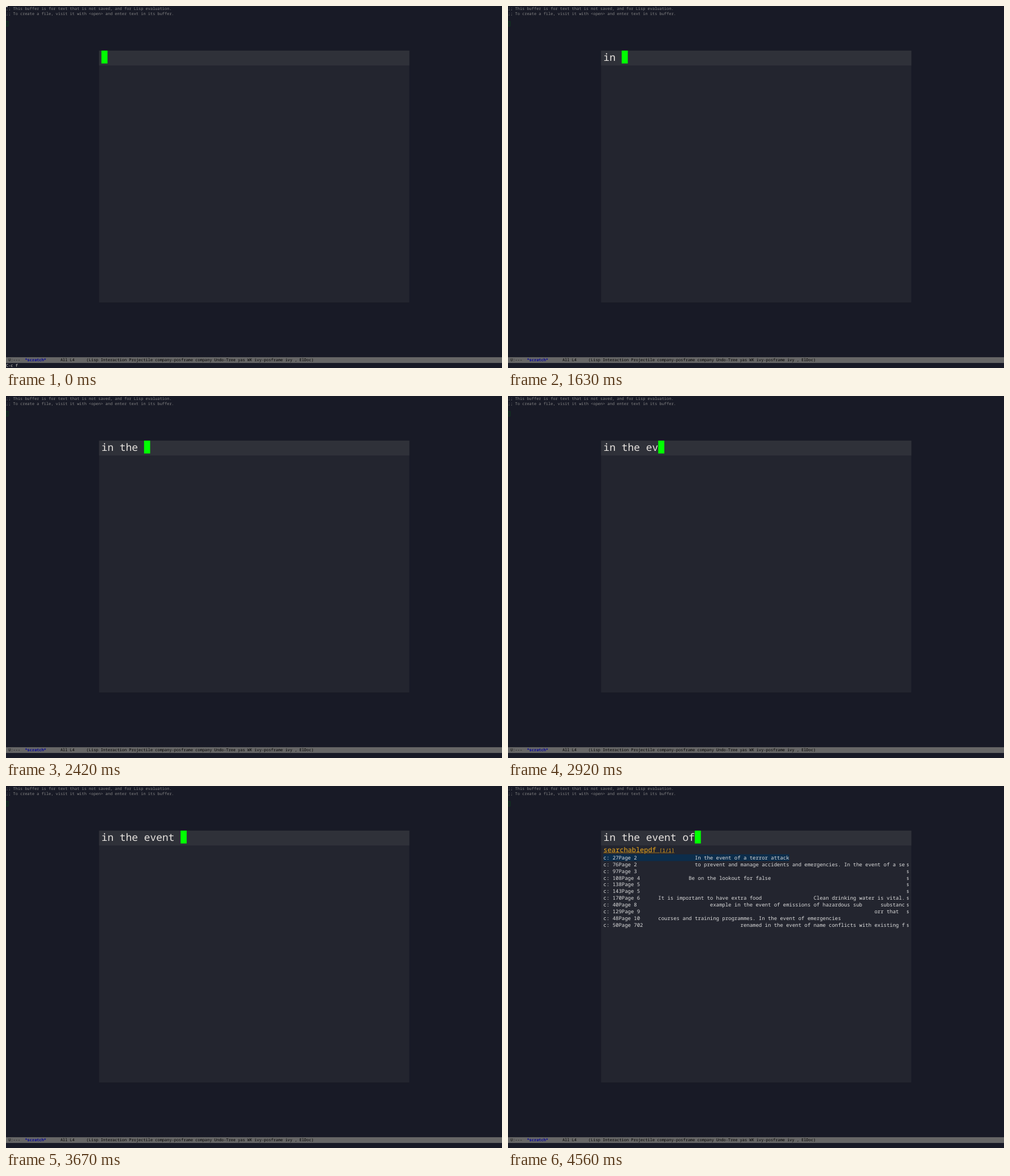
An HTML page that plays this animation: 876 px wide and 640 px high, repeating every 8 s.

```html
<!DOCTYPE html>
<html lang="en">
<head>
<meta charset="utf-8">
<style>
html, body { margin: 0; width: 876px; height: 640px; overflow: hidden; background: #181a26; }
div { position: absolute; white-space: pre; }
/* the screen is laid out on a whole-pixel character grid, then scaled down */
#screen {
  left: 0; top: 0; width: 1466px; height: 1071px;
  transform: scale(.5976); transform-origin: 0 0;
  font: 11.667px/15px "Noto Sans Mono", monospace;
  text-rendering: geometricPrecision;
}
#note { left: 0; top: 0; color: #858585; }
#point { left: 0; top: 45px; width: 5px; height: 13px; border: 1px solid #075018; }
#pointer { left: 0; top: 0; width: 5px; height: 3px; background: #e4e4e4; }
#mode { left: 0; top: 1039px; width: 1466px; height: 17px; line-height: 17px; background: #666; color: #000; }
#mode b { color: #00009c; }
#echo { left: 0; top: 1056px; color: #e4e0d8; }
#panel { left: 275px; top: 132px; width: 917px; height: 745px; background: #23252f; }
#prompt { left: 0; top: 0; width: 917px; height: 44px; background: #2f3139; }
#typed { left: 7px; top: 0; font-size: 30px; line-height: 38px; color: #e8e4e0; }
#cursor { top: 0; width: 18px; height: 38px; background: #0f0; }
#results { left: 7px; top: 44px; width: 903px; font-size: 15px; color: #dedede; }
#head { left: 0; top: 0; line-height: 25px; color: #eca81c; text-decoration: underline; }
#head span { font-size: 20px; }
.row {
  left: 0; width: 903px; height: 20px; line-height: 20px;
  display: flex; align-items: baseline; justify-content: space-between;
}
.row:nth-child(2) span { background: #0c2d4b; }
.row small { font-size: 11.667px; }
</style>
</head>
<body>
<div id="screen">
  <div id="note">;; This buffer is for text that is not saved, and for Lisp evaluation.
;; To create a file, visit it with &lt;open&gt; and enter text in its buffer.</div>
  <div id="point"></div>
  <div id="pointer"></div>
  <div id="panel">
    <div id="prompt"></div>
    <div id="typed"></div>
    <div id="cursor"></div>
    <div id="results"><div id="head"><span>searchablepdf</span> [1/1]</div></div>
  </div>
  <div id="mode"> U:---  <b>*scratch*</b>      All L4     (Lisp Interaction Projectile company-posframe company Undo-Tree yas WK ivy-posframe ivy , ElDoc)</div>
  <div id="echo">C-c f</div>
</div>
<script>
const LOOP = 8000, SHOW = 4560, CELL = 18, ROW = 20;
const query = 'in the event of';
const keys = [1200, 1440, 1630, 2000, 2140, 2320, 2420, 2690, 2920, 3200, 3350, 3480, 3670, 3950, 4050];

// label, then column and text pairs
const rows = [
  ['c: 27Page 2', 30, 'In the event of a terror attack'],
  ['c: 76Page 2', 30, 'to prevent and manage accidents and emergencies. In the event of a se'],
  ['c: 97Page 3'],
  ['c: 108Page 4', 28, 'Be on the lookout for false'],
  ['c: 138Page 5'],
  ['c: 143Page 5'],
  ['c: 170Page 6', 18, 'It is important to have extra food', 69, 'Clean drinking water is vital.'],
  ['c: 40Page 8', 35, 'example in the event of emissions of hazardous sub', 91, 'substanc'],
  ['c: 129Page 9', 89, 'orr that'],
  ['c: 48Page 10', 18, 'courses and training programmes. In the event of emergencies'],
  ['c: 50Page 702', 45, 'renamed in the event of name conflicts with existing f']
];
const untruncated = [0, 9];

const $ = id => document.getElementById(id);
const results = $('results');

function add(parent, tag, text = '') {
  const el = document.createElement(tag);
  el.textContent = text;
  parent.append(el);
  return el;
}

rows.forEach(([line, ...parts], i) => {
  for (let k = 0; k < parts.length; k += 2) line = line.padEnd(parts[k]) + parts[k + 1];
  const row = add(results, 'div');
  row.className = 'row';
  row.style.top = 26 + i * ROW + 'px';
  add(row, 'span', line);
  if (!untruncated.includes(i)) add(row, 'small', '$');
});

function draw(now) {
  const t = now % LOOP;
  const count = keys.filter(k => k <= t).length;
  const idle = count ? 'hidden' : 'visible';
  $('typed').textContent = query.slice(0, count);
  $('cursor').style.left = 7 + count * CELL + 'px';
  $('echo').style.visibility = $('pointer').style.visibility = idle;
  results.style.visibility = t >= SHOW ? 'visible' : 'hidden';
  requestAnimationFrame(draw);
}
draw(performance.now());
</script>
</body>
</html>
```
